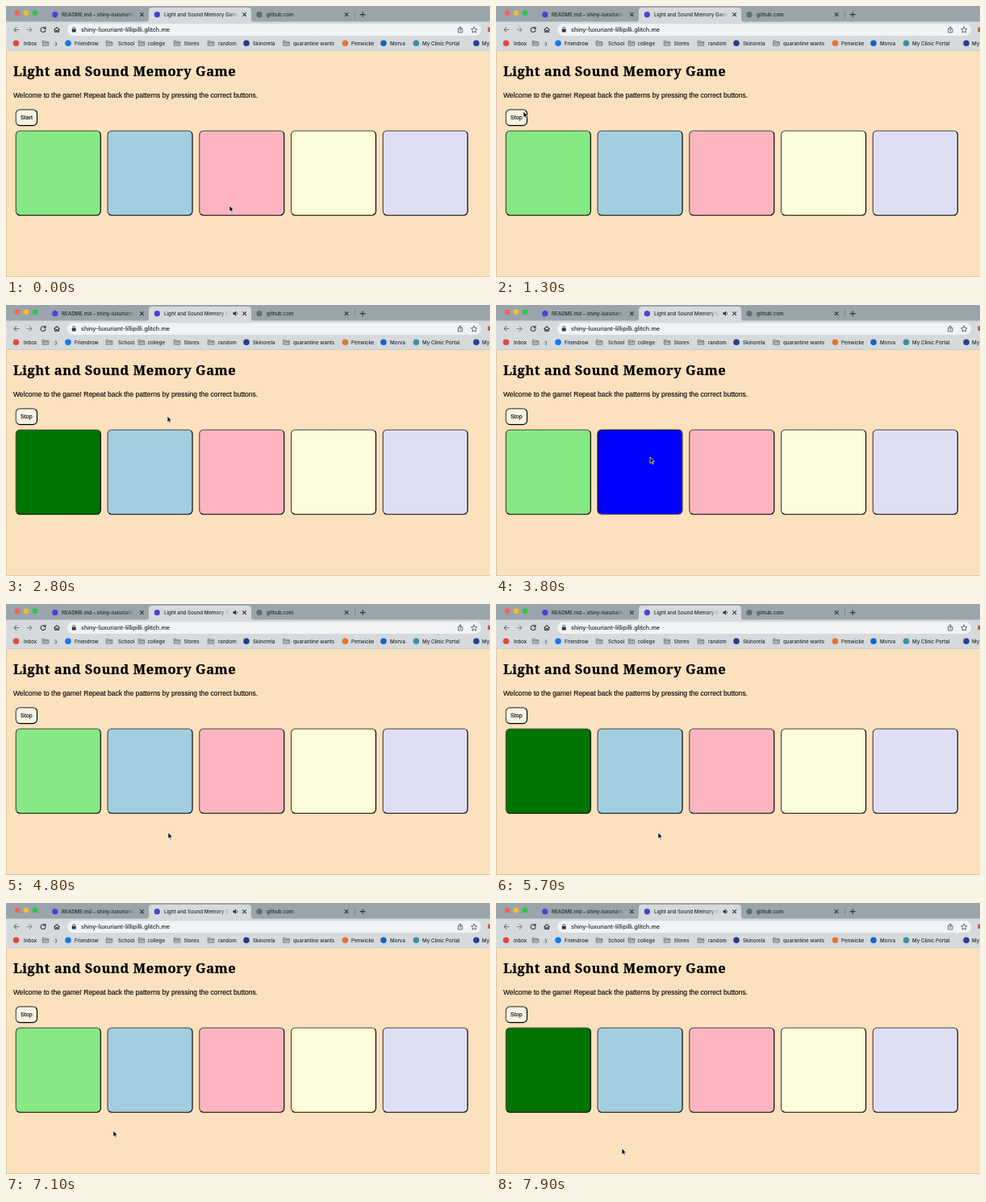
An HTML page that plays this animation: 600 by 337 pixels, repeating every 8 s.

```html
<!DOCTYPE html>
<html lang="en">
<head>
<meta charset="utf-8">
<title>Light and Sound Memory Game</title>
<style>
  html, body { margin: 0; width: 100%; height: 100%; overflow: hidden; background: #fbe1be; }
  svg { display: block; width: 100%; height: 100%; }
  text { white-space: pre; }
  .ui { font: 500 6.2px Inter, Roboto, sans-serif; fill: #22282b; }
  .url { font: 500 7.25px Inter, Roboto, sans-serif; fill: #1e2326; }
  .title { font: bold 16.5px "Noto Serif", Georgia, serif; letter-spacing: .5px; stroke: #000; stroke-width: .25; }
  .body { font: 8.5px "Liberation Sans", Arial, sans-serif; stroke: #000; stroke-width: .12; }
  .label { font: 7.1px "Liberation Sans", Arial, sans-serif; stroke: #000; stroke-width: .12; }
  .line { fill: none; stroke: #2d3437; stroke-width: 1.05; stroke-linecap: round; stroke-linejoin: round; }
</style>
</head>
<body>
<svg viewBox="0 0 600 337" preserveAspectRatio="none">
  <defs>
    <linearGradient id="fadeDark"><stop offset="0" stop-color="#99a5ab" stop-opacity="0"/><stop offset="1" stop-color="#99a5ab"/></linearGradient>
    <linearGradient id="fadeLight"><stop offset="0" stop-color="#d6dadc" stop-opacity="0"/><stop offset="1" stop-color="#d6dadc"/></linearGradient>
    <linearGradient id="outset" x2="1" y2="1"><stop offset=".5" stop-color="#484848"/><stop offset=".5" stop-color="#000"/></linearGradient>
    <linearGradient id="inset" x2="1" y2="1"><stop offset=".5" stop-color="#000"/><stop offset=".5" stop-color="#5c5c50"/></linearGradient>
    <clipPath id="tabA"><rect x="66" y="0" width="93" height="20"/></clipPath>
    <clipPath id="tabB"><rect id="titleClip" x="194" y="0" width="95" height="20"/></clipPath>
  </defs>

  <rect width="600" height="337" fill="#fbe1be"/>
  <rect width="600" height="20" fill="#99a5ab"/>
  <rect y="19.5" width="600" height="36.5" fill="#d6dadc"/>
  <rect y="55.4" width="600" height=".6" fill="#c3c6c6"/>
  <path d="M173 20q4 0 4-4V6q0-4 4-4H300q4 0 4 4V16q0 4 4 4z" fill="#d6dadc"/>

  <circle cx="14" cy="8.8" r="3.2" fill="#fe5f57"/>
  <circle cx="25" cy="8.8" r="3.2" fill="#febc2e"/>
  <circle cx="36" cy="8.8" r="3.2" fill="#28c840"/>

  <circle cx="60.8" cy="10.7" r="3.6" fill="#4a41d2"/>
  <circle cx="187.3" cy="10.7" r="3.6" fill="#4a41d2"/>
  <circle cx="314" cy="10.7" r="3.6" fill="#626c71"/>
  <g class="ui">
    <text x="69" y="13" clip-path="url(#tabA)">README.md – shiny-luxuriant-lillipilli</text>
    <rect x="147" y="4" width="13" height="13" fill="url(#fadeDark)"/>
    <text x="196" y="13" clip-path="url(#tabB)">Light and Sound Memory Game</text>
    <rect id="titleFade" x="276" y="4" width="13" height="13" fill="url(#fadeLight)"/>
    <text x="323" y="13">github.com</text>
  </g>
  <g id="sound">
    <path d="M281.5 9.3h1.6l2-1.8v6.2l-2-1.8h-1.6z" fill="#2b3236"/>
    <path class="line" d="M286.3 9.2q1.2 1.4 0 2.8" style="stroke-width:.7"/>
  </g>
  <path class="line" d="M166.4 8.6l4 4m0-4l-4 4M293.6 8.6l4 4m0-4l-4 4M420.2 8.6l4 4m0-4l-4 4M439.2 10.6h6m-3-3v6"/>
  <path d="M432.5 6v9" stroke="#707c82" stroke-width=".7"/>

  <rect x="76" y="22.3" width="513" height="14.6" rx="7.3" fill="#f1f3f4"/>
  <g class="line">
    <path d="M16 29.5h-6m2.8-2.8l-2.8 2.8 2.8 2.8" style="stroke:#6c7478"/>
    <path d="M26 29.5h6m-2.8-2.8l2.8 2.8-2.8 2.8" style="stroke:#868f94"/>
    <path d="M48.4 27.5a3 3 0 1 0 .7 2.4M49 26v2.2h-2.2"/>
    <path d="M59.7 29.6l3.3-3 3.3 3M60.7 29.2v3.3h1.5v-2h1.6v2h1.5v-3.3"/>
    <path d="M82.8 28.8v-1a1.4 1.4 0 0 1 2.8 0v1" style="stroke-width:.8"/>
    <path d="M562 28.3h-1.4v4.6h5.2v-4.6h-1.4M563.2 31v-5m-1.4 1.3l1.4-1.4 1.4 1.4" style="stroke-width:.7"/>
    <path d="M580.3 26l1.1 2.4 2.6.3-1.9 1.8.5 2.6-2.3-1.3-2.3 1.3.5-2.6-1.9-1.8 2.6-.3z" style="stroke-width:.7"/>
  </g>
  <rect x="81.8" y="28.7" width="4.8" height="3.8" rx=".6" fill="#2d3437"/>
  <rect x="597.5" y="26.5" width="2.5" height="5.5" fill="#d8473e"/>
  <text class="url" x="93" y="32.2">shiny-luxuriant-lillipilli.glitch.me</text>

  <g id="bookmarks" class="ui"></g>

  <text class="title" x="9" y="86.5">Light and Sound Memory Game</text>
  <text class="body" x="9" y="114.2">Welcome to the game! Repeat back the patterns by pressing the correct buttons.</text>
  <g id="page"></g>
  <path d="M.3 56V336.7H600" fill="none" stroke="#8c8272" stroke-opacity=".6" stroke-width=".6"/>
  <path id="cursor" d="M0 0V7.8L1.7 6.3 3 9 4.2 8.4 3 5.8H5.4z" fill="#000" stroke="#fff" stroke-width=".7"/>
</svg>

<script>
const LOOP = 8000, STEP = 100;
const $ = id => document.getElementById(id);

function add(parent, tag, attrs, text) {
  const el = document.createElementNS("http://www.w3.org/2000/svg", tag);
  for (const key in attrs) el.setAttribute(key, attrs[key]);
  if (text) el.textContent = text;
  parent.append(el);
  return el;
}

// icon centre, label x, label, dot colour (none: folder)
const bookmarks = [
  [12.5, 22, "Inbox", "#df4a3f"],
  [49, 59, ":)"],
  [77, 85, "Friendrow", "#1877f2"],
  [128, 139, "School"],
  [168, 175.5, "college"],
  [212, 220.5, "Stores"],
  [254, 263, "random"],
  [298, 306, "Skinorela", "#2d3b80"],
  [347.5, 356, "quarantine wants"],
  [420.5, 428, "Penwicke", "#e4742f"],
  [468, 476, "Morva", "#1464c0"],
  [508.5, 516, "My Clinic Portal", "#3f8fa0"],
  [583, 590, "My", "#2b3f94"]
];
for (const [cx, x, label, color] of bookmarks) {
  const bar = $("bookmarks");
  if (color) add(bar, "circle", { cx, cy: 46.2, r: 3.8, fill: color });
  else add(bar, "path", {
    d: `M${cx - 3.8} 43.4h2.8l1 1h3.8v4.8h-7.6zm0 2.4h7.6`,
    fill: "#b4babd", stroke: "#626a6e", "stroke-width": .7, "stroke-linejoin": "round"
  });
  add(bar, "text", { x, y: 48.5 }, label);
}

function box(x, y, width, height, fill) {
  return add($("page"), "rect", { x, y, width, height, rx: 5, fill, stroke: "url(#outset)", "stroke-width": 1.15 });
}

box(12.3, 128.8, 26.2, 19.8, "#f8f4e4");
const label = add($("page"), "text", { class: "label", x: 18, y: 141.3 });
const idle = ["#86e983", "#a1cfdf", "#ffb5c1", "#fdfdda", "#dedff5"];
const lit = ["#007400", "#0000ff"];
const pads = idle.map((fill, i) => box(12.3 + i * 113.75, 155.2, 105, 105, fill));

// start, end, pad, pressed by hand
const lights = [
  [2200, 3200, 0, false],
  [3700, 4000, 1, true],
  [5000, 6000, 0, false],
  [6300, 6600, 0, true],
  [7600, 8000, 0, false]
];

// time, x, y
const path = [
  [0, 277, 248], [300, 277, 248], [1000, 34, 131], [1500, 34, 131],
  [2300, 200, 138], [2900, 200, 138], [3500, 191, 189], [4000, 191, 189],
  [4500, 201, 284], [5700, 201, 284], [6200, 67, 220], [6700, 67, 220],
  [7300, 156, 305], [8000, 156, 305]
];

function cursorAt(t) {
  const i = path.findIndex(p => p[0] > t);
  const [t0, x0, y0] = path[i - 1], [t1, x1, y1] = path[i];
  const u = (t - t0) / (t1 - t0), k = u * u * (3 - 2 * u);
  return [x0 + (x1 - x0) * k, y0 + (y1 - y0) * k];
}

function draw(t) {
  $("cursor").setAttribute("transform", `translate(${cursorAt(t)})`);
  label.textContent = t < 1200 ? "Start" : "Stop";

  const audible = t >= 2200;
  $("sound").style.display = audible ? "" : "none";
  $("titleClip").setAttribute("width", audible ? 83 : 95);
  $("titleFade").setAttribute("x", audible ? 264 : 276);

  const now = lights.find(([a, b]) => t >= a && t < b);
  pads.forEach((pad, i) => {
    const on = now && now[2] === i, held = on && now[3];
    pad.setAttribute("fill", on ? lit[i] : idle[i]);
    pad.setAttribute("stroke", held ? "url(#inset)" : "url(#outset)");
  });
}

const begin = performance.now();
function tick() {
  const t = (performance.now() - begin) % LOOP;
  draw(Math.floor(t / STEP) * STEP);
  requestAnimationFrame(tick);
}
tick();
</script>
</body>
</html>
```
